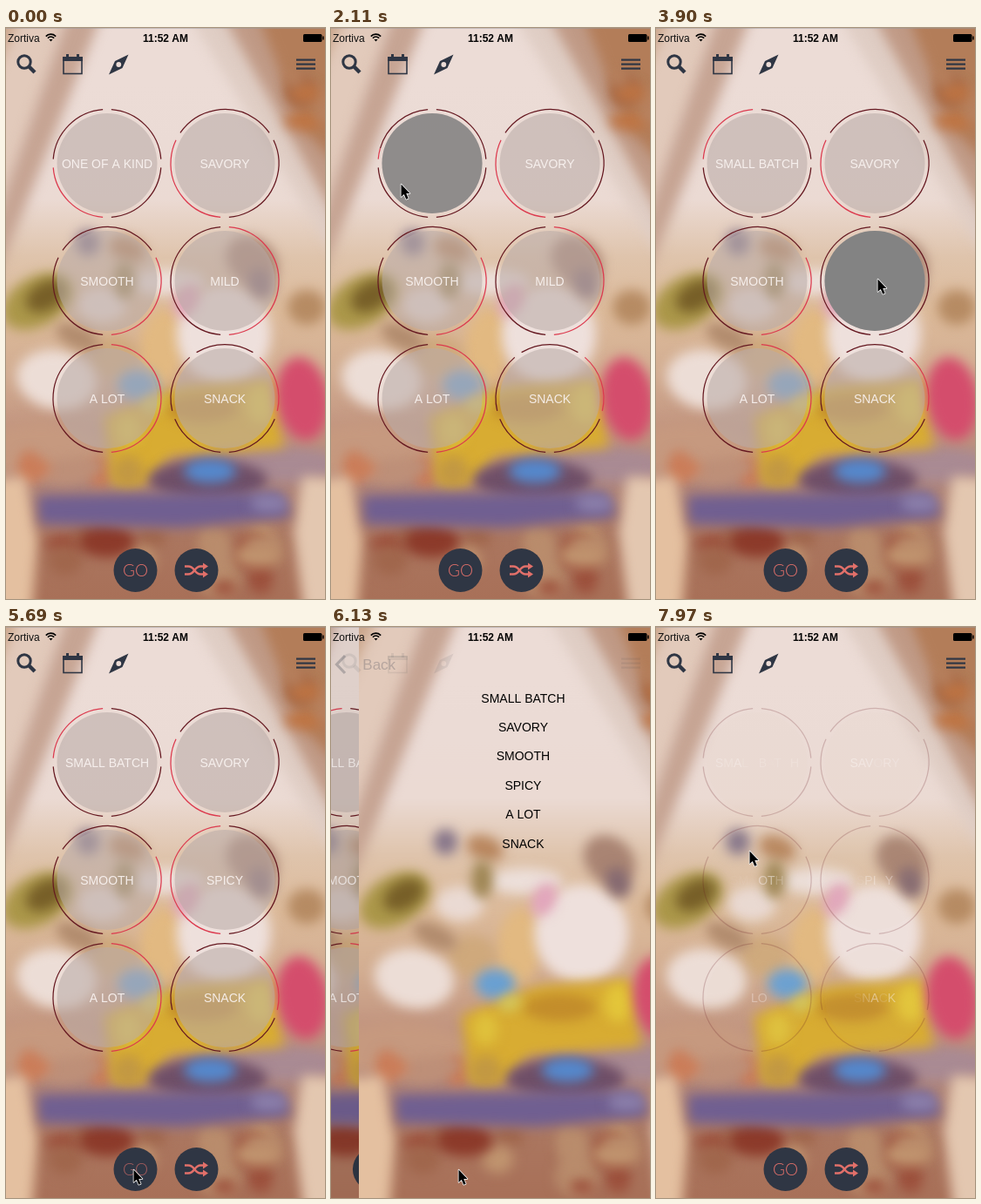
Recreate the animation shown at these times as an HTML page with a canvas. Size 366 by 656 pixels, loop 8000 ms.

```html
<!DOCTYPE html>
<html lang="en">
<head>
<meta charset="utf-8">
<title>Flavor picker</title>
<style>
html, body { margin: 0; width: 100%; height: 100%; overflow: hidden; background: #ecdcd6; }
canvas { display: block; width: 366px; height: 656px; }
</style>
</head>
<body>
<canvas id="stage" width="366" height="656"></canvas>
<script>
const W = 366, H = 656, LOOP = 8000, BLEED = 5, BEAT = 148;
const INK = '#2f3644', CORAL = '#e2706a', RED = '#dc3a4e', MAROON = '#651820';
const SANS = '"Liberation Sans", Arial, sans-serif';
const ctx = document.getElementById('stage').getContext('2d');

const PUSH = 5980, PUSHED = 6420, POP = 7670, POPPED = 7970;

const MOVES = [
  { at: 750, end: 750, x: 96, y: 483 },
  { at: 1380, end: 1670, x: 80, y: 179 },
  { at: 3310, end: 3600, x: 254, y: 288 },
  { at: 5240, end: 5690, x: 146, y: 623, bow: -47 },
  { at: POP, end: POP, x: 30, y: 46 },
  { at: POP + BEAT, end: POPPED, x: 107, y: 257 }
];

// Segments count clockwise from the bottom; "on" is the red one.
const DIALS = [
  { parts: 4, on: 0, label: 'ONE OF A KIND', next: { at: 1960, on: 1, label: 'SMALL BATCH' } },
  { parts: 3, on: 0, label: 'SAVORY' },
  { parts: 3, on: 2, label: 'SMOOTH' },
  { parts: 2, on: 1, label: 'MILD', next: { at: 3900, on: 0, label: 'SPICY' } },
  { parts: 2, on: 1, label: 'A LOT' },
  { parts: 5, on: 3, label: 'SNACK' }
];

const clamp = v => Math.max(0, Math.min(1, v));
const mix = (a, b, p) => a + (b - a) * p;
const smooth = p => p * p * (3 - 2 * p);
const rad = deg => deg * Math.PI / 180;
const rnd = n => { const v = Math.sin(n * 12.9898) * 43758.5453; return v - Math.floor(v); };
// Time since a start, held for one beat at a time.
const held = (t, start) => Math.floor((t - start) / BEAT) * BEAT;

function path(c, pts, close) {
  c.beginPath();
  pts.forEach((p, i) => i ? c.lineTo(p[0], p[1]) : c.moveTo(p[0], p[1]));
  if (close) c.closePath();
}

function disc(x, y, r, color) {
  ctx.fillStyle = color;
  ctx.beginPath();
  ctx.arc(x, y, r, 0, 2 * Math.PI);
  ctx.fill();
}

function text(str, x, y, font, color, align) {
  ctx.font = font;
  ctx.fillStyle = color;
  ctx.textAlign = align || 'left';
  ctx.fillText(str, x, y);
}

// Blurred scene: a soft gradient, a few flat shapes and seeded patches.
function paintBackdrop() {
  const cv = document.createElement('canvas');
  cv.width = W + 2 * BLEED;
  cv.height = H;
  const c = cv.getContext('2d');
  const base = c.createLinearGradient(0, 0, 0, H);
  ['#ecdcd6', '#ecdcd6', '#ebdbd5', '#ebdad3', '#dfc4ac', '#dcba9a', '#d3ae92', '#c29580', '#b2877a', '#ab765f', '#a87058']
    .forEach((color, i) => base.addColorStop(i / 10, color));
  c.fillStyle = base;
  c.fillRect(0, 0, cv.width, H);
  c.translate(BLEED, 0);
  c.filter = 'blur(7px)';
  const poly = (color, ...pts) => {
    c.fillStyle = color;
    path(c, pts, true);
    c.fill();
  };
  const blob = (color, x, y, rx, ry, turn = 0) => {
    c.fillStyle = color;
    c.beginPath();
    c.ellipse(x, y, rx, ry, rad(turn), 0, 2 * Math.PI);
    c.fill();
  };
  const scatter = (seed, count, colors, x, y, w, h, size) => {
    for (let i = 0; i < count; i++) {
      const n = seed + i * 4;
      blob(colors[i % colors.length], x + w * rnd(n), y + h * rnd(n + 1),
        size * (0.7 + rnd(n + 2)), size * (0.5 + rnd(n + 3)));
    }
  };
  // roof
  poly('#e2cabb', [-30, -30], [80, -30], [-30, 290]);
  poly('#c6a493', [76, -30], [116, -30], [-30, 335], [-30, 270]);
  poly('#cba78d', [-30, -30], [24, -30], [-30, 90]);
  poly('#dfcdc4', [200, -30], [262, -30], [400, 240], [400, 300]);
  poly('#c09a86', [240, -30], [310, -30], [400, 150], [400, 258]);
  poly('#b37d59', [282, -30], [400, -30], [400, 180], [340, 115]);
  scatter(5, 6, ['#a76b49', '#bf7442', '#b8825f'], 310, 5, 60, 105, 15);
  // middle
  blob('#ecdfda', 185, 292, 44, 15);
  blob('#eadad3', 110, 318, 28, 20);
  blob('#e2b981', 178, 368, 26, 46, 8);
  blob('#cfa97c', 125, 378, 28, 24);
  blob('#eee0dc', 250, 352, 54, 56);
  blob('#ecddd6', 58, 404, 46, 34, 10);
  blob('#87768a', 94, 247, 14, 15);
  blob('#b9875f', 139, 254, 22, 14, 20);
  blob('#9d8553', 136, 290, 12, 22);
  blob('#ab9749', 36, 314, 44, 28, -30);
  blob('#775f28', 46, 308, 25, 16, -30);
  blob('#b18b6d', 82, 355, 27, 13, 25);
  blob('#a98473', 282, 268, 32, 26, 40);
  blob('#856970', 292, 294, 14, 18, -20);
  blob('#e2a5bd', 207, 313, 13, 20, 25);
  blob('#b68b63', 345, 321, 22, 20);
  // lower half
  blob('#c6997f', 40, 485, 80, 32);
  scatter(41, 5, ['#cb7c58', '#bd8f78'], 15, 495, 100, 35, 15);
  blob('#a98a93', 320, 502, 70, 20);
  poly('#d8ac32', [112, 446], [200, 412], [308, 404], [318, 482], [190, 492], [158, 525], [122, 525]);
  blob('#c38d2b', 225, 437, 42, 16);
  blob('#e3c53a', 292, 432, 16, 22);
  blob('#dfc13c', 140, 462, 14, 18);
  blob('#c29843', 140, 510, 18, 18);
  blob('#69a0d2', 151, 410, 23, 17);
  blob('#d4c75c', 168, 432, 14, 9, -20);
  blob('#d44d6c', 340, 426, 30, 48, -8);
  poly('#e4c0a0', [-30, 520], [22, 515], [36, 590], [28, 690], [-30, 690]);
  poly('#e3c7b0', [400, 520], [340, 515], [330, 580], [344, 690], [400, 690]);
  scatter(73, 14, ['#9c503c', '#b98c6c', '#a0664c', '#c0946f'], 60, 580, 250, 65, 17);
  blob('#8c3a2a', 116, 590, 32, 18);
  blob('#6f4f68', 232, 519, 68, 23);
  poly('#705f91', [36, 537], [315, 533], [328, 562], [200, 574], [38, 570]);
  blob('#5588cc', 234, 509, 30, 14);
  blob('#8c80ab', 302, 546, 22, 10);
  return cv;
}
const backdrop = paintBackdrop();

function ring(x, y, from, to, color) {
  ctx.strokeStyle = color;
  ctx.lineWidth = 1.25;
  ctx.beginPath();
  ctx.arc(x, y, 62, rad(from), rad(to));
  ctx.stroke();
}

// Letters light up one by one in a random order.
function shine(str, x, y, p, seed) {
  ctx.font = `14px ${SANS}`;
  ctx.textAlign = 'left';
  ctx.fillStyle = '#faf3f1';
  const left = x - ctx.measureText(str).width / 2;
  [...str].forEach((ch, i) => {
    const at = ctx.measureText(str.slice(0, i + 1)).width - ctx.measureText(ch).width;
    const delay = 0.15 + 0.35 * rnd(seed * 31 + i + 1);
    ctx.globalAlpha = 0.92 * clamp((p - delay) / 0.5);
    ctx.fillText(ch, left + at, y);
  });
  ctx.globalAlpha = 1;
}

function dial(d, t, i) {
  const x = 116 + 135 * (i % 2), y = 155.5 + 135 * Math.floor(i / 2);
  const fading = t >= POPPED;
  const changed = d.next && t >= d.next.at;
  const { on, label } = changed ? d.next : d;
  const age = changed ? held(t, d.next.at) : LOOP;
  const p = clamp(age / (7 * BEAT));
  const flash = 1 - clamp(age / (6 * BEAT));
  disc(x, y, 57.5, `rgba(186,171,168,${fading ? 0.03 : 0.56})`);
  if (flash) disc(x, y, 57.5, `rgba(131,131,131,${flash})`);
  ctx.globalAlpha = fading ? 0.22 : 1;
  const span = 360 / d.parts, gap = 4.5;
  for (let k = 0; k < d.parts; k++) {
    const from = 90 + k * span + gap, to = from + span - 2 * gap;
    const mid = k === on && !fading ? mix(from, to, p) : from;
    if (mid < to) ring(x, y, mid, to, MAROON);
    if (mid > from) ring(x, y, from, mid, RED);
  }
  ctx.globalAlpha = 1;
  shine(label, x, y + 5.5, fading ? 0.45 : p, i + 1);
}

function buttons(t) {
  disc(148.5, 623, 25, INK);
  disc(218.5, 623, 25, INK);
  ctx.globalAlpha = t >= 5690 && t < PUSH ? 0.65 : 1;
  text('GO', 148.5, 630, '300 19px Lato, sans-serif', CORAL, 'center');
  ctx.globalAlpha = 1;
  ctx.strokeStyle = ctx.fillStyle = CORAL;
  ctx.lineWidth = 2.5;
  for (const s of [-1, 1]) {
    const y = v => 623 + s * v;
    ctx.beginPath();
    ctx.moveTo(205, y(-4.5));
    ctx.lineTo(209, y(-4.5));
    ctx.bezierCurveTo(217, y(-4.5), 216, y(4.5), 223, y(4.5));
    ctx.lineTo(227, y(4.5));
    ctx.stroke();
    path(ctx, [[226, y(0.6)], [232, y(4.5)], [226, y(8.4)]], true);
    ctx.fill();
  }
}

function homePage(x, t, dials) {
  ctx.save();
  ctx.translate(x, 0);
  ctx.drawImage(backdrop, -BLEED, 0);
  if (dials) DIALS.forEach((d, i) => dial(d, t, i));
  buttons(t);
  ctx.restore();
}

function listPage(x) {
  ctx.drawImage(backdrop, x - BLEED, 0);
  DIALS.forEach((d, i) => {
    const { label } = d.next || d;
    text(label, x + 183, 86.5 + 33.4 * i, `14px ${SANS}`, '#000', 'center');
  });
}

function icons(alpha) {
  ctx.globalAlpha = alpha;
  ctx.strokeStyle = ctx.fillStyle = INK;
  // search
  ctx.lineWidth = 3;
  ctx.beginPath();
  ctx.arc(21, 39, 7.2, 0, 2 * Math.PI);
  ctx.stroke();
  ctx.lineWidth = 4.4;
  path(ctx, [[26.5, 44.5], [33, 51]]);
  ctx.stroke();
  // calendar
  ctx.lineWidth = 1.6;
  ctx.strokeRect(66, 34, 21, 18.5);
  ctx.fillRect(65, 33, 23, 5);
  ctx.fillRect(69, 30, 3, 5);
  ctx.fillRect(81, 30, 3, 5);
  // compass
  path(ctx, [[140.5, 30.5], [133.5, 46], [118, 53.5], [125, 38]], true);
  ctx.moveTo(132.2, 42);
  ctx.arc(129.3, 42, 2.9, 0, 2 * Math.PI);
  ctx.fill('evenodd');
  // menu
  for (let k = 0; k < 3; k++) ctx.fillRect(333, 35.5 + 5 * k, 22, 2.2);
  ctx.globalAlpha = 1;
}

function backLink(p) {
  ctx.globalAlpha = p === 1 ? 1 : 0.3 * p;
  ctx.strokeStyle = INK;
  ctx.lineWidth = 3.2;
  path(ctx, [[16, 33], [6.5, 43], [16, 53]]);
  ctx.stroke();
  text('Back', 23 + 130 * (1 - p), 49, `17px ${SANS}`, '#3f4250');
  ctx.globalAlpha = 1;
}

function statusBar() {
  ctx.fillStyle = 'rgba(150,150,155,.45)';
  ctx.fillRect(0, 0, W, 1);
  text('Zortiva', 2, 16, `12px ${SANS}`, '#111');
  text('11:52 AM', 183, 16, `bold 12px ${SANS}`, '#000', 'center');
  ctx.strokeStyle = '#000';
  ctx.lineWidth = 1.7;
  for (const r of [4.8, 7.8]) {
    ctx.beginPath();
    ctx.arc(51.5, 15, r, rad(-137), rad(-43));
    ctx.stroke();
  }
  path(ctx, [[51.5, 15.5], [49.4, 13], [53.6, 13]], true);
  ctx.fill();
  ctx.beginPath();
  ctx.roundRect(341, 7, 21.5, 9, 1.5);
  ctx.fill();
  ctx.fillRect(363.2, 9.5, 1.5, 4);
}

function pointer(t) {
  const i = MOVES.findLastIndex(m => m.at <= t);
  if (i < 0) return;
  const to = MOVES[i], from = MOVES[i - 1] || to;
  const beats = Math.round((to.end - to.at) / BEAT) + 1;
  const p = clamp((held(t, to.at) / BEAT + 1) / beats);
  const x = mix(from.x, to.x, smooth(p)) + (to.bow || 0) * Math.sin(Math.PI * p);
  ctx.save();
  ctx.translate(x + 0.5, mix(from.y, to.y, smooth(p)) + 0.5);
  path(ctx, [[0, 0], [0, 14.5], [3.3, 11.4], [5.7, 17.2], [8.2, 16.2], [5.8, 10.5], [10, 10.5]], true);
  ctx.fillStyle = '#000';
  ctx.strokeStyle = '#fff';
  ctx.lineWidth = 1.5;
  ctx.lineJoin = 'round';
  ctx.stroke();
  ctx.fill();
  ctx.restore();
}

// How far the list page has slid in: 0 hidden, 1 in place.
function slide(t) {
  const ease = start => 1 - Math.exp(-(held(t, start) + 80) / 100);
  if (t < PUSH || t >= POPPED) return 0;
  if (t < PUSHED) return ease(PUSH);
  return t < POP ? 1 : 1 - ease(POP);
}

function draw(t) {
  const p = slide(t);
  if (p < 1) homePage(-0.3 * W * p, t, t < PUSHED || t >= POPPED);
  if (p > 0) {
    ctx.fillStyle = `rgba(0,0,0,${0.06 * p})`;
    ctx.fillRect(0, 0, W, H);
    listPage(W * (1 - p));
    backLink(p);
  }
  if (p < 1) icons(p ? (1 - p) * 0.9 : 1);
  statusBar();
  pointer(t);
}

function tick(now) {
  draw(now % LOOP);
  requestAnimationFrame(tick);
}
draw(0);
requestAnimationFrame(tick);
</script>
</body>
</html>
```
